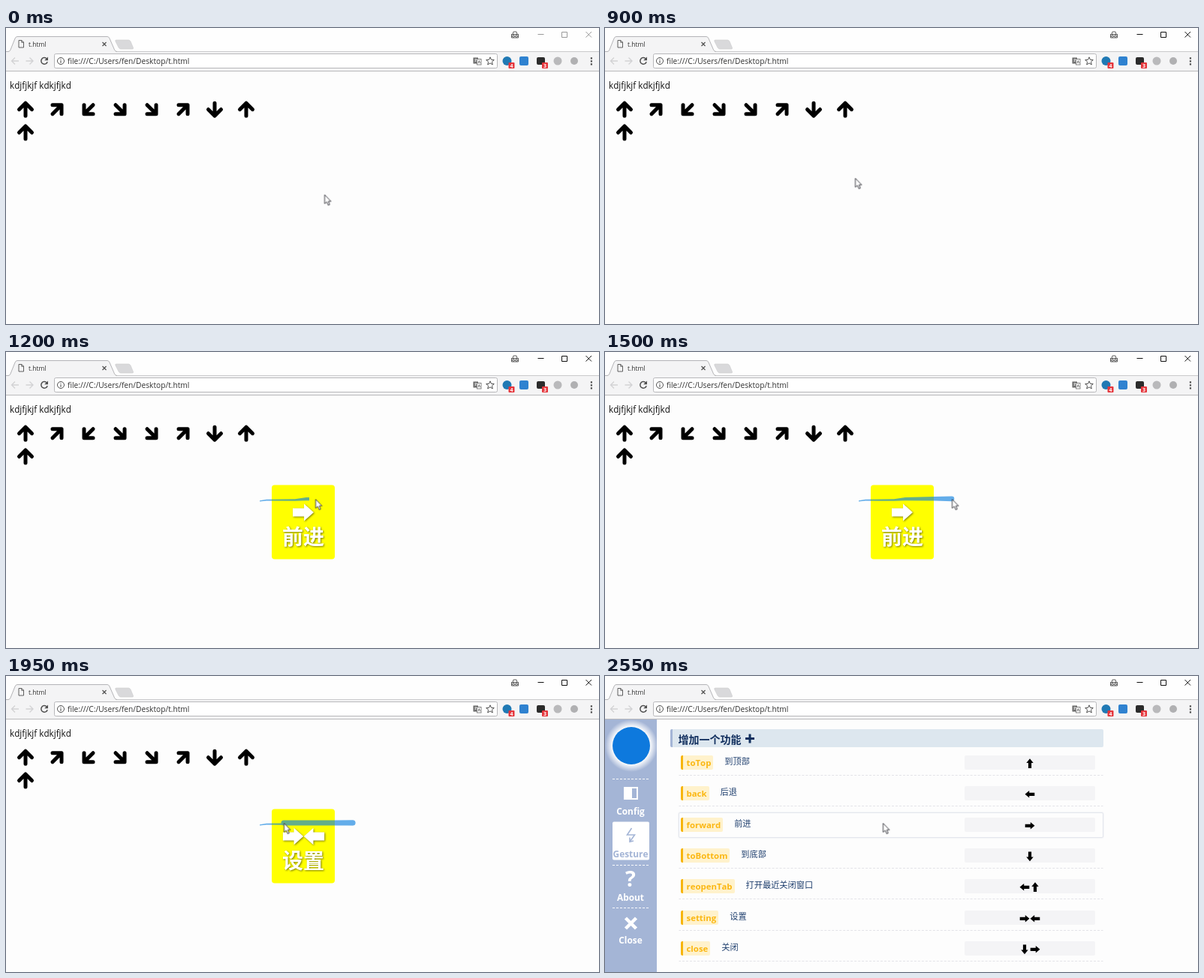
An HTML page that plays this animation: 790x395 px, repeating every 2.7 s.

```html
<!DOCTYPE html>
<html lang="zh-CN">
<head>
<meta charset="utf-8">
<title>Mouse gestures</title>
<style>
  html, body { margin: 0; width: 100%; height: 100%; overflow: hidden; background: #fdfdfd; }
  body { position: relative; font-family: "Open Sans", "Noto Sans", "Noto Sans CJK SC", "Noto Sans CJK", sans-serif; font-kerning: none; }
  body > *, #trail svg { position: absolute; left: 0; top: 0; }
  svg { display: block; overflow: visible; }
  .full { width: 790px; height: 395px; }
  .cjk { font-family: "Noto Sans CJK SC", "Noto Sans CJK", sans-serif; }
  .line { fill: none; stroke: #4f4f4f; }

  /* Everything jumps between poses on a 150 ms grid. */
  .anim { animation: 2.7s step-end infinite; }
  #cursor { animation-name: move; }
  #buttons { animation-name: focus; }
  #pad { animation-name: pad; }
  #forward { animation-name: forward; }
  #setting { animation-name: setting; }
  #go { animation-name: go; }
  #back { animation-name: back; }
  #options { animation-name: options; }

  @keyframes move {
    0% { transform: translate(424.5px, 222.5px); }
    5.555% { transform: translate(412.5px, 246.5px); }
    11.111% { transform: translate(385.5px, 240.5px); }
    16.666% { transform: translate(350.5px, 203.5px); }
    22.222% { transform: translate(333.5px, 200.5px); }
    38.888% { transform: translate(380.5px, 197.5px); }
    44.444% { transform: translate(412.5px, 196.5px); }
    50% { transform: translate(445.5px, 196.5px); }
    55.555% { transform: translate(462.5px, 196.5px); }
    61.111% { transform: translate(420.5px, 196.5px); }
    66.666%, 100% { transform: translate(370.5px, 196.5px); }
  }
  @keyframes focus { 0% { stroke: #999; } 33.333%, 100% { stroke: #111; } }
  @keyframes pad { 0% { opacity: 0; } 38.888%, 100% { opacity: 1; } }
  @keyframes forward { 0% { opacity: 1; } 61.111%, 100% { opacity: 0; } }
  @keyframes setting { 0% { opacity: 0; } 61.111%, 100% { opacity: 1; } }
  @keyframes go {
    0% { clip-path: inset(0 790px 0 0); }
    38.888% { clip-path: inset(0 422px 0 0); }
    44.444% { clip-path: inset(0 386px 0 0); }
    50% { clip-path: inset(0 345px 0 0); }
    55.555%, 100% { clip-path: inset(0); }
  }
  @keyframes back {
    0% { opacity: 0; stroke-dashoffset: 92; }
    61.111% { opacity: 1; stroke-dashoffset: 50; }
    66.666%, 100% { opacity: 1; stroke-dashoffset: 0; }
  }
  @keyframes options { 0% { opacity: 0; } 77.777%, 100% { opacity: 1; } }

  #trail { opacity: .62; }
  #pad .sign { fill: #fff; filter: drop-shadow(1px 1px 1px rgba(0, 0, 0, .5)); }
  #pad text { font-size: 28px; font-weight: 700; text-anchor: middle; }

  #options { background: #fdfdfd; clip-path: inset(58px 0 0 0); }
  #options > * { position: absolute; }
  #side { left: 0; top: 0; font-weight: 700; font-size: 11.9px; text-anchor: middle; fill: #fff; }
  #head { left: 87px; top: 71px; width: 574px; height: 24px; border-left: 3px solid #a4b5d6; border-radius: 2px; background: #dde7ef; }
  .row { left: 98px; width: 564px; height: 32px; border: 1px solid transparent; border-bottom: 1px dashed #e3e3e8; }
  .row.hover { border: 1px solid #e3e6ed; border-radius: 2px; box-shadow: 0 0 2px #dfe2ea; }
  .row > * { position: absolute; }
  .name { left: 2px; top: 6px; display: flex; line-height: 19px; white-space: nowrap; }
  .name b { padding: 0 3px 0 4.5px; border-left: 3.5px solid #f7b50c; border-radius: 2px; background: #fff2cc; color: #fbb712; font-size: 11.4px; }
  .name span { margin: -2px 0 0 15px; color: #1f3f6e; font-size: 11.2px; }
  .slot { left: 380px; top: 6px; width: 174px; height: 19px; border-radius: 2px; background: #f4f4f6; }
</style>
</head>
<body>

<svg class="full" viewBox="0 0 790 395">
  <defs>
    <path id="block" d="M6.5 0L.5-5.3V-2.6H-6.5V2.6H.5V5.3Z"/>
    <path id="small" d="M6.5 0L.8-4.7V-2.1H-6.3V2.1H.8V4.7Z"/>
    <path id="round" d="M-8.5 0L0-8.5L8.5 0M0-8V8.5" fill="none" stroke="#000" stroke-width="5" stroke-linecap="round" stroke-linejoin="round"/>
    <radialGradient id="glow">
      <stop offset=".7" stop-color="#fff"/>
      <stop offset="1" stop-color="#fff" stop-opacity="0"/>
    </radialGradient>
  </defs>

  <!-- window frame and tab -->
  <rect width="790" height="31" fill="#fefefe"/>
  <rect y="31" width="790" height="27" fill="#f4f4f5"/>
  <path d="M0 31.5H790" stroke="#c9c9cb"/>
  <path d="M3 32L5 30.5L12 14Q13 12 15 12H135Q137 12 138 14L145 30.5L147 32Z" fill="#f4f4f5"/>
  <path class="line" d="M0 31.5H3Q5 31.5 6 29L12 14Q13 11.5 15 11.5H135Q137 11.5 138 14L144.5 29Q145.5 31.5 148 31.5" style="stroke:#b4b4b7"/>
  <path d="M147 16H163Q165 16 166 18L169.5 26.5Q170 28 168 28H153Q151 28 150 26L146 18Q145 16 147 16Z" fill="#d9d9db" stroke="#cacacc" stroke-width=".6"/>
  <path class="line" d="M17 16.5H21L23.5 19V26H17ZM20.8 16.5V19.2H23.5" stroke-width=".9"/>
  <text x="30" y="25" font-size="8.5" fill="#333">t.html</text>
  <path class="line" d="M128.5 19L133.5 24M133.5 19L128.5 24" stroke-width="1.2"/>
  <g class="line" stroke-width=".9">
    <path d="M673 8.5H683M675 8.5L676 5H680L681 8.5M673.5 9V13H682.5V9"/>
    <circle cx="676" cy="11" r="1.4"/><circle cx="680" cy="11" r="1.4"/>
  </g>
  <path id="buttons" class="anim" d="M708.5 8.5H716.5M740.5 5.5H747.5V12.5H740.5ZM772.5 5L780 12.5M780 5L772.5 12.5" fill="none"/>

  <!-- toolbar -->
  <path d="M0 57.5H790" stroke="#b9b9bc"/>
  <path d="M17 44H8M12 39.5L7.5 44L12 48.5M26.5 44H35.5M31.5 39.5L36 44L31.5 48.5" fill="none" stroke="#d2d2d4" stroke-width="1.3"/>
  <path class="line" d="M54.3 41A4.3 4.3 0 1 0 55.2 45.3" stroke-width="1.5"/>
  <path d="M56 38.5V43.3H51.2Z" fill="#4f4f4f"/>
  <rect x="64.5" y="34.5" width="590" height="19" rx="2" fill="#fff" stroke="#b7b7ba"/>
  <circle class="line" cx="73" cy="44" r="4.5"/>
  <path class="line" d="M73 43.3V46.8M73 41.2V42.3" stroke-width="1.1"/>
  <text x="82" y="48" font-size="10.2" fill="#333">file:///C:/Users/fen/Desktop/t.html</text>
  <rect x="622.5" y="39.5" width="6.5" height="8" fill="#666"/>
  <rect x="627.5" y="41.5" width="5.5" height="7.5" fill="#fff" stroke="#777" stroke-width=".9"/>
  <path d="M624 42H627.5M625.8 41V42M627 42L624.3 45.5M624.6 43L627 45.5" stroke="#fff" stroke-width=".7" fill="none"/>
  <path class="line" d="M629 47L630.3 43.5L631.6 47" stroke-width=".8"/>
  <path class="line" d="M645 38.8L646.5 42.3L650.3 42.6L647.4 45.1L648.3 48.9L645 46.9L641.7 48.9L642.6 45.1L639.7 42.6L643.5 42.3Z"/>
  <circle cx="667.5" cy="44" r="6" fill="#2079b4"/>
  <rect x="684" y="38" width="12" height="12" rx="2" fill="#2f82d0"/>
  <rect x="707" y="39" width="11" height="10" rx="2" fill="#2b2b2b"/>
  <circle cx="735" cy="44" r="5.5" fill="#b9b9bb"/>
  <circle cx="757" cy="44" r="5" fill="#b0b0b2"/>
  <g font-size="7" font-weight="700" text-anchor="middle">
    <rect x="669.5" y="46" width="8" height="8" rx="1" fill="#e5353b"/><text x="673.5" y="52.6" fill="#fff">4</text>
    <rect x="714" y="46" width="8" height="8" rx="1" fill="#e5353b"/><text x="718" y="52.6" fill="#fff">3</text>
  </g>
  <path d="M778.8 39.2h2.2v2.2h-2.2zM778.8 43.2h2.2v2.2h-2.2zM778.8 47.2h2.2v2.2h-2.2z" fill="#4f4f4f"/>

  <!-- plain page -->
  <text x="5" y="80.5" font-size="11.7" fill="#111">kdjfjkjf kdkjfjkd</text>
  <g id="arrows"></g>
</svg>

<svg id="pad" class="full anim" viewBox="0 0 790 395">
  <rect x="354" y="177.5" width="84" height="99" rx="4" fill="#ff0"/>
  <g id="forward" class="anim">
    <g class="sign">
      <use href="#block" transform="translate(396 214) scale(2.15)"/>
      <text class="cjk" x="396" y="257">前进</text>
    </g>
  </g>
  <g id="setting" class="anim">
    <g class="sign">
      <use href="#block" transform="translate(382.5 214) scale(2.1)"/>
      <use href="#block" transform="translate(410.5 214) scale(-2.1)"/>
      <text class="cjk" x="396" y="257">设置</text>
    </g>
  </g>
</svg>

<div id="trail" class="full">
  <svg id="go" class="full anim" viewBox="0 0 790 395">
    <path fill="#057ddf" d="M338 198.3L347 196.8L385 196.2L400 194L440 193L462 192.6A3.3 3.3 0 0 1 462 199.2L440 198.6L400 198.2L385 198.7L347 198.6L338 199.4Z"/>
  </svg>
  <svg class="full" viewBox="0 0 790 395">
    <path id="back" class="anim" d="M462 196H370" fill="none" stroke="#057ddf" stroke-width="7" stroke-linecap="round" stroke-dasharray="92 200"/>
  </svg>
</div>

<div id="options" class="full anim">
  <svg id="side" class="full" viewBox="0 0 790 395">
    <rect y="58" width="69" height="337" fill="#a4b5d6"/>
    <circle cx="35" cy="93" r="35" fill="url(#glow)"/>
    <circle cx="35" cy="93" r="25" fill="#0e79dd"/>
    <path d="M10 137.5H59M10 252.5H59M10 309.5H59" stroke="#fff" stroke-dasharray="3 2"/>
    <path d="M26 149H43V164H26Z" fill="none" stroke="#fff" stroke-width="2"/>
    <rect x="26" y="149" width="10" height="15"/>
    <text x="34" y="185">Config</text>
    <rect x="10" y="194.5" width="49" height="51" rx="2"/>
    <g fill="#a4b5d6">
      <path d="M35.5 203L29.5 212H39.5L33.5 220.5M33 215.5V221.2L38 220" fill="none" stroke="#a4b5d6" stroke-width="1.6"/>
      <text x="34" y="242">Gesture</text>
    </g>
    <text x="34" y="280.5" font-size="29">?</text>
    <text x="34" y="300">About</text>
    <path d="M27.5 323L41.5 337M41.5 323L27.5 337" stroke="#fff" stroke-width="4.5"/>
    <text x="34" y="357">Close</text>
  </svg>
  <div id="head"></div>
  <svg class="full" viewBox="0 0 790 395">
    <text class="cjk" x="97.5" y="89.5" font-size="14" font-weight="700" fill="#12305f">增加一个功能</text>
    <path d="M187 83.5H199M193 77.5V89.5" stroke="#12305f" stroke-width="3"/>
  </svg>
</div>

<svg id="cursor" class="anim" width="12" height="18">
  <path d="M0 0V12L2.8 9.6L4.8 14L6.8 13.1L4.9 8.9H8.5Z" fill="#fff" stroke="#2b2b33" stroke-width=".9"/>
</svg>

<script>
  const use = (id, x, y, turn) =>
    `<use href="#${id}" transform="translate(${x} ${y}) rotate(${turn})"/>`;

  const turns = [0, 45, 225, 135, 135, 45, 180, 0];
  document.getElementById('arrows').innerHTML =
    turns.map((turn, i) => use('round', 26 + 42 * i, 108.7, turn)).join('') + use('round', 26, 139.5, 0);

  const angle = { R: 0, D: 90, L: 180, U: 270 };
  const rows = [
    ['toTop', '到顶部', 'U'],
    ['back', '后退', 'L'],
    ['forward', '前进', 'R'],
    ['toBottom', '到底部', 'D'],
    ['reopenTab', '打开最近关闭窗口', 'LU'],
    ['setting', '设置', 'RL'],
    ['close', '关闭', 'DR']
  ];

  const signs = path => [...path].map((c, i) =>
    use('small', 87 + 14 * (i - (path.length - 1) / 2), 10.8, angle[c])).join('');

  const rowHtml = ([name, label, path], i) => `
    <div class="row${name === 'forward' ? ' hover' : ''}" style="top:${Math.round(99 + 41.35 * i)}px">
      <div class="name"><b>${name}</b><span class="cjk">${label}</span></div>
      <div class="slot"><svg width="174" height="19">${signs(path)}</svg></div>
    </div>`;

  document.getElementById('options').insertAdjacentHTML('beforeend', rows.map(rowHtml).join(''));
</script>
</body>
</html>
```
